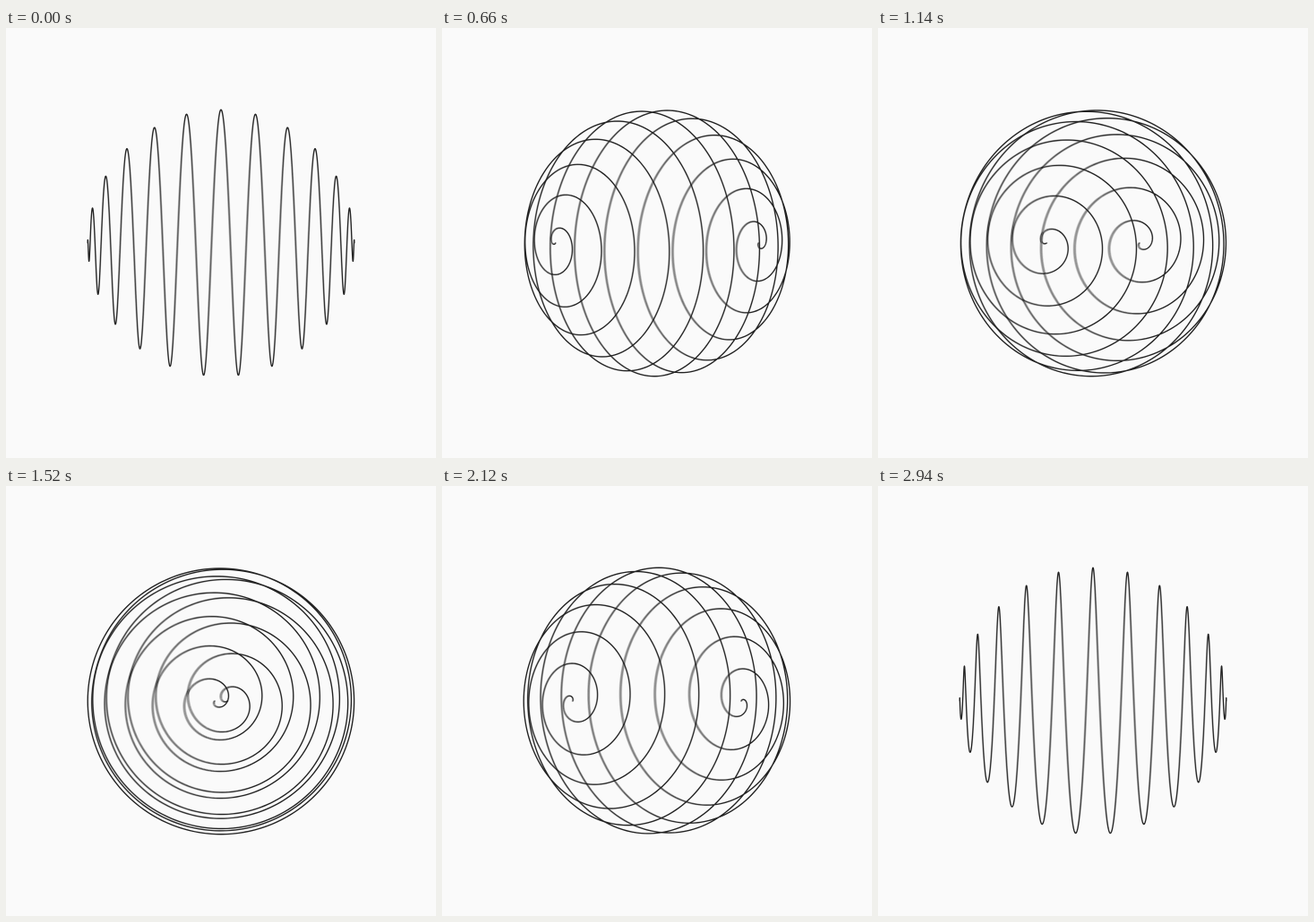
An HTML page with a canvas that plays this animation: 480x480 px, repeating every 2960 ms.

```html
<!DOCTYPE html>
<html lang="en">
<head>
<meta charset="utf-8">
<title>Turning spherical spiral</title>
<style>
  html, body { margin: 0; width: 100%; height: 100%; overflow: hidden; background: #fafafa; }
  canvas { display: block; width: 480px; height: 480px; }
</style>
</head>
<body>
<canvas id="stage" width="480" height="480"></canvas>
<script>
const ctx = document.getElementById('stage').getContext('2d');
const TAU = 2 * Math.PI;
const CENTER = 240, RADIUS = 148.8;
const COILS = 12, POINTS = 1800;
const STEP = 20, STEPS = 148;
const SAMPLES = 6, SHUTTER = 0.6;

// Strokes of all samples add up to one opaque line, which gives motion blur.
ctx.globalCompositeOperation = 'lighter';
ctx.strokeStyle = `rgba(32, 32, 32, ${1 / SAMPLES})`;
ctx.lineWidth = 1.4;
ctx.lineCap = ctx.lineJoin = 'round';

function strokeSpiral(u) {
  const turn = Math.PI * u;
  const cos = Math.cos(turn), sin = Math.sin(turn);
  const spin = TAU * 2.5 * (1 - cos);
  ctx.beginPath();
  for (let i = 0; i <= POINTS; i++) {
    const theta = Math.PI * i / POINTS;
    const phi = 2 * COILS * theta + spin;
    const ring = RADIUS * Math.sin(theta);
    const x = -RADIUS * Math.cos(theta);
    const z = ring * Math.sin(phi);
    ctx.lineTo(CENTER + x * cos + z * sin, CENTER - ring * Math.cos(phi));
  }
  ctx.stroke();
}

function draw(ms) {
  const step = Math.floor((ms + 0.5) / STEP) % STEPS;
  ctx.clearRect(0, 0, 480, 480);
  for (let s = 0; s < SAMPLES; s++) {
    strokeSpiral((step + SHUTTER * s / SAMPLES) / STEPS);
  }
}

const start = performance.now();
function tick() {
  draw(performance.now() - start);
  requestAnimationFrame(tick);
}
tick();
</script>
</body>
</html>
```
